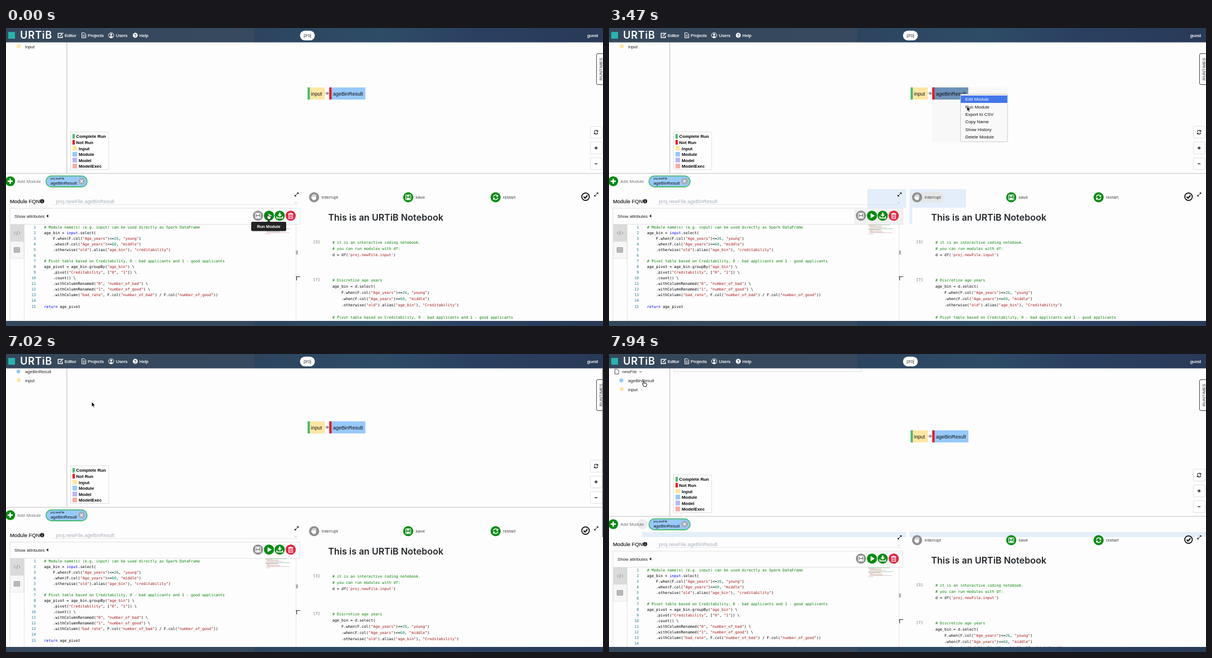
An HTML page for the animation above (8 s loop, 1059 by 529 pixels).

```html
<!DOCTYPE html>
<html lang="en">
<head>
<meta charset="utf-8">
<title>Module editor</title>
<style>
html, body { margin: 0; width: 100%; height: 100%; overflow: hidden; background: #fdfdfd; }
svg { display: block; width: 1059px; height: 529px; }
text { font-family: "Liberation Sans", Arial, sans-serif; white-space: pre; }
.mono { font-family: "DejaVu Sans Mono", monospace; font-size: 6.67px; }
.brand { font-family: Inter, sans-serif; font-weight: 600; }
</style>
</head>
<body>
<svg id="stage" viewBox="0 0 1059 529"></svg>
<script>
const LOOP = 8000;
const C = { green: '#078a12', run: '#4cbb74', red: '#e8141c', input: '#ffe6a3', module: '#97c9fb',
  model: '#b8b5f8', exec: '#f8aca3', gray: '#8f8f8f', band: '#e3eefa' };

// y is the vertical middle of the text line
const text = (x, y, str, size = 7.85, fill = '#111', attrs = '') =>
  `<text x="${x}" y="${y + size * .36}" font-size="${size}" fill="${fill}" ${attrs}>${str}</text>`;
const rect = (x, y, w, h, fill, attrs = '') =>
  `<rect x="${x}" y="${y}" width="${w}" height="${h}" fill="${fill}" ${attrs}/>`;
const circle = (x, y, r, fill, attrs = '') => `<circle cx="${x}" cy="${y}" r="${r}" fill="${fill}" ${attrs}/>`;
const line = (d, stroke = '#ddd', width = 1, attrs = '') =>
  `<path d="${d}" fill="none" stroke="${stroke}" stroke-width="${width}" ${attrs}/>`;
const fillPath = (d, fill) => `<path d="${d}" fill="${fill}"/>`;
const at = (x, y, content, scale = 1) => `<g transform="translate(${x} ${y}) scale(${scale})">${content}</g>`;
const group = (id, content) => `<g id="${id}">${content}</g>`;

const icon = {
  plus: c => line('M-3.5 0H3.5M0-3.5V3.5', c, 1.9),
  save: () => rect(-4.5, -4.5, 9, 9, 'none', 'stroke="#fff" stroke-width="1.2" rx="1"') +
    rect(-2.5, -4, 4.5, 3, '#fff') + rect(-2.8, .8, 5.6, 3.4, '#fff'),
  play: () => fillPath('M-2.5-4.5L5 0L-2.5 4.5Z', '#fff'),
  download: () => fillPath('M-1.4-5.5H1.4V-2H4L0 2L-4-2H-1.4Z', '#fff') + line('M-5 1V4.2H5V1', '#fff', 1.7),
  trash: () => rect(-3.3, -2.6, 6.6, 7.6, 'none', 'stroke="#fff" stroke-width="1.1"') +
    line('M-4.6-3.6H4.6M-1.5-4.8H1.5M-1.2-1V3.5M1.2-1V3.5', '#fff', 1),
  refresh: c => line('M-4-.8A4 4 0 0 1 3-2.8M4 .8A4 4 0 0 1-3 2.8', c, 1.6) +
    fillPath('M4.6-5V-.8H.6ZM-4.6 5V.8H-.6Z', c),
  hand: () => line('M-3.2-1V-3.4M-1.2-1V-5M.9-1V-5M3-1V-4M-5 0L-2.5 3', '#fff', 1.3, 'stroke-linecap="round"') +
    fillPath('M-3.8-1H3.6V2L2 5H-2L-4 2Z', '#fff'),
  expand: () => line('M-2.4 2.4L2.4-2.4', '#111', 1) + fillPath('M3.5-3.5V-.3L.3-3.5ZM-3.5 3.5V.3L-.3 3.5Z', '#111'),
};
const button = (x, y, color, name) => circle(x, y, 9, color) + at(x, y, icon[name]('#fff'));

const moduleCode = String.raw`# Module name(s) (e.g. input) can be used directly as Spark DataFrame
age_bin = input.select(
    F.when(F.col("Age_years")<=26, "young")
    .when(F.col("Age_years")<=60, "middle")
    .otherwise("old").alias("age_bin"), "creditability")

# Pivot table based on Creditability, 0 - bad applicants and 1 - good applicants
age_pivot = age_bin.groupBy("age_bin") \
    .pivot("Creditability", ["0", "1"]) \
    .count() \
    .withColumnRenamed("0", "number_of_bad") \
    .withColumnRenamed("1", "number_of_good") \
    .withColumn("bad_rate", F.col("number_of_bad") / F.col("number_of_good"))

return age_pivot`.split('\n');

const loadCell = `# it is an interactive coding notebook.
# you can run modules with df:
d = df('proj.newFile.input')`.split('\n');

const binCell = `# Discretize age years
age_bin = d.select(
    F.when(F.col("Age_years")<=26, "young")
    .when(F.col("Age_years")<=60, "middle")
    .otherwise("old").alias("age_bin"), "Creditability")

# Pivot table based on Creditability, 0 - bad applicants and 1 - good applicants`.split('\n');

const escape = s => s.replace(/</g, '&lt;');
const TOKEN = /(#.*$)|("[^"]*"|'[^']*')|\b(\d+)\b|\b(input|return)\b|[^#"'\d\w]+|\w+/g;
const tokenColors = ['#008000', '#a31515', '#098658', '#0000f0'];
function highlight(source) {
  return source.replace(TOKEN, (token, ...kinds) => {
    const kind = kinds.slice(0, 4).findIndex(Boolean);
    return kind < 0 ? escape(token) : `<tspan fill="${tokenColors[kind]}">${escape(token)}</tspan>`;
  });
}
const codeBlock = (x, y, step, lines) =>
  lines.map((s, i) => text(x, y + i * step, highlight(s), 6.67, '#000', 'class="mono"')).join('');

function miniMap() {
  return moduleCode.map((s, i) => {
    const indent = s.search(/\S|$/);
    return rect(460 + indent * .55, 349.3 + i * 1.13, (s.length - indent) * .55, .8,
      s[0] === '#' ? '#6faa6f' : '#c09a9a', 'opacity=".65"');
  }).join('');
}

function graph() {
  const legend = [['Complete Run', C.run], ['Not Run', C.red], ['Input', C.input],
    ['Module', C.module], ['Model', C.model], ['ModelExec', C.exec]];
  const tools = [[185, icon.refresh('#222')], [213, icon.plus('#222')], [241, line('M-3 0H3', '#222', 1.7)]];
  return line('M115 -20V1H448V-20') +
    rect(107, -10, 1.6, 268, '#d2d2d2') + rect(0, 257.5, 1059, 1.5, '#d6d6d6') +
    line('M10.5-3V5.5H17V-1L14.5-3Z', '#444', .9) +
    text(23, 1.7, 'newFile', 7.7, '#333') + line('M54 0.5L56 2.5L58 .5', '#333', .9) +
    circle(22, 17, 3.4, C.module) + text(34, 17, 'ageBinResult', 7.75, '#222') +
    circle(22.5, 32.5, 3.4, C.input) + text(34, 32.8, 'input', 7.75, '#222') +
    rect(535, 105.5, 30.5, 21.5, C.input) + rect(535, 105.5, 4, 21.5, C.run) + text(541, 116.3, 'input', 8.95) +
    line('M565.5 116H570', '#999') + fillPath('M568.5 113L574 116L568.5 119Z', '#888') +
    rect(573.5, 105.5, 64, 21.5, C.module, 'id="moduleNode"') + rect(573.5, 105.5, 4, 21.5, C.red) +
    text(580, 116.3, 'ageBinResult', 8.95) +
    rect(114.5, 184.5, 67.5, 67, '#fefefe', 'stroke="#ddd" stroke-width=".9"') +
    legend.map(([label, color], i) => rect(118, 188.2 + i * 10.55, i < 2 ? 4 : 8, 8.3, color) +
      text(i < 2 ? 124.5 : 129, 192.6 + i * 10.55, label, 7.8, '#000', 'font-weight="bold"')).join('') +
    tools.map(([y, art]) => rect(1036.5, y - 10.5, 21, 21, '#fff', 'rx="1.5" stroke="#e2e2e2"') +
      at(1046.7, y, art, .8)).join('');
}

function modulePanel() {
  return circle(7.5, 272, 8.7, C.green) + at(7.5, 272, icon.plus('#fff'), 1.3) +
    text(20, 272, 'Add Module', 7.85, '#777') +
    rect(71, 262.7, 72.8, 19.3, C.module, `rx="9.6" stroke="${C.run}" stroke-width="1.8"`) +
    text(79, 267.5, 'proj.newFile', 4.5) + text(79, 274.8, 'ageBinResult', 7.8) +
    circle(134, 272, 6, '#a3adb5') + line('M131.7 269.7L136.3 274.3M136.3 269.7L131.7 274.3', '#fff', 1.2) +
    text(7, 307.3, 'Module FQN', 9.4, '#222', 'stroke="#222" stroke-width=".2"') +
    circle(64, 307.5, 3.7, '#111') + line('M64 306.8V310M64 304.8V306', '#fff', 1.1) +
    text(88.5, 307.3, 'proj.newFile.ageBinResult', 8.95, '#a9b0bb') +
    line('M83 313.5H518', '#e3e3e3', .8) + line('M511.5 309L513.7 311L516 309', '#aaa', .8) +
    at(515.5, 295.5, icon.expand()) +
    line('M7 520V320H521V348.5H7', '#dedede', .9) + text(15, 333.7, 'Show attributes', 7.8, '#222') +
    fillPath('M75 331V336.4L71.5 333.7Z', '#222') +
    group('toolbarTint', rect(435, 322, 85.5, 25.5, '#f1f1f1')) +
    button(447, 333.2, C.gray, 'save') + button(466.5, 333.2, C.green, 'play') +
    button(485.5, 333.2, C.green, 'download') + button(505, 333.2, '#dc2846', 'trash') +
    rect(7.5, 349, 24.5, 30, '#dadada') + rect(7.5, 379, 24.5, 30, '#f6f6f6', 'stroke="#ddd" stroke-width=".7"') +
    line('M17 361.5L14.5 364L17 366.5M22.5 361.5L25 364L22.5 366.5M20.7 360.5L18.7 367.5', '#888', .9) +
    rect(14.5, 390, 9.5, 8, 'none', 'stroke="#777"') + line('M14.5 392.8H24M14.5 395.3H24M17.7 390V398M20.9 390V398', '#777', .8) +
    line('M32.3 349V520', '#ddd', .8) +
    moduleCode.map((_, i) => text(53, 353.7 + i * 10.03, i + 1, 6.67, '#237893', 'class="mono" text-anchor="end"')).join('') +
    codeBlock(67.5, 353.7, 10.03, moduleCode) + miniMap() +
    line('M514.5 349V560', '#e0e0e0', .8) + rect(514, 395, 4, 7, '#b5b5b5') + line('M514 441.5H522M515.5 441.5V448', '#333', 1.2);
}

function notebook() {
  return button(546.5, 300.5, C.gray, 'hand') + text(560, 300, 'interrupt', 7.9, '#444') +
    button(713.5, 300.5, C.green, 'save') + text(726.5, 300, 'save', 7.9, '#444') +
    button(868.5, 300.5, C.green, 'refresh') + text(881.5, 300, 'restart', 7.9, '#444') +
    circle(1028, 299.5, 6.7, '#fff', 'stroke="#111" stroke-width="1.8"') +
    line('M1024.6 299.5L1027.2 302L1031.5 297', '#111', 2) + at(1047, 295.5, icon.expand()) +
    text(571.5, 336, 'This is an URTiB Notebook', 16, '#23272b', 'class="brand"') +
    text(545, 380, '[3]', 6.9, '#666', 'class="mono"') + codeBlock(579, 380.3, 11.1, loadCell) +
    text(545, 447, '[7]', 6.9, '#666', 'class="mono"') + codeBlock(579, 447.3, 11.1, binCell);
}

function contextMenu() {
  const items = ['Edit Module', 'Run Module', 'Export to CSV', 'Copy Name', 'Show History', 'Delete Module'];
  return rect(637.5, 105.5, 69.5, 12, '#f8f8f8') + rect(573.5, 127, 50, 75, '#f8f8f8') +
    rect(623.5, 117.5, 83.5, 84.5, '#f9f9f9', 'rx="1.5" stroke="#c4c4c4" stroke-width=".9"') +
    rect(624, 119.8, 82.6, 13.2, '#4377ea', 'id="menuBar"') +
    items.map((label, i) => text(632, 126.5 + i * 13.35, label, 7.9, '#111', 'class="item"')).join('');
}

function header() {
  const label = (x, str) => text(x, 13.2, str, 7.85, '#fff', 'stroke="#fff" stroke-width=".2"');
  return rect(0, 0, 1059, 25.5, 'url(#bar)') + rect(4, 7, 12, 12, '#28b3ae') +
    text(25, 13, 'URTiB', 18, '#fff', 'class="brand" letter-spacing=".7"') +
    line('M99 9.5H92.5V17H100V13.5M95.5 14.5L101.5 8.5', '#fff', 1.4) + label(104, 'Editor') +
    line('M134.5 8.5H139L141.5 11V17.5H134.5ZM136 12.5H140M136 15H140', '#fff', 1) + label(145, 'Projects') +
    circle(186.5, 13, 4.6, 'none', 'stroke="#fff"') + circle(186.5, 11.7, 1.9, '#fff') +
    fillPath('M183 16.2Q186.5 12.5 190 16.2L186.5 17.6Z', '#fff') + label(195, 'Users') +
    circle(229.3, 13, 4.4, '#fff') + text(229.3, 13, '?', 7.5, '#30465b', 'font-weight="bold" text-anchor="middle"') +
    label(236.5, 'Help') + rect(521.5, 4.7, 26.3, 17.4, '#fff', 'rx="8.7"') +
    text(534.8, 13, 'proj', 8.3, '#444', 'text-anchor="middle"') + label(1031, 'guest');
}

const bandPatches = rect(458, 286, 69, 33, C.band) + rect(533, 286, 100, 33, C.band) +
  rect(458, 319, 63, 29, '#f1f5fa') + rect(533, 319, 5, 29, C.band) + rect(547, 291, 47, 18.5, '#e4e6e8', 'rx="9"');
const bandStrip = rect(59, 286, 468, 9, C.band) + rect(533, 286, 526, 9, C.band) + rect(50, 263, 18.5, 18, '#ececec', 'rx="9"');

const arrow = '<path d="M0 0V8.6L2 6.8L3.4 10L4.9 9.3L3.5 6.3H6.2Z" fill="#000" stroke="#fff" stroke-width=".7"/>';
const hand = `<path d="M-2.2-4.5Q-1.2-5.5-.6-4.3V-1.5L3.6-.6Q4.4 0 4 1.8L3 4.8H-1.2L-4-.2Q-3.4-1.3-2.2 0Z"
  fill="#fff" stroke="#111" stroke-width="1"/>`;

document.getElementById('stage').innerHTML = `
  <defs><linearGradient id="bar">
    <stop offset="0" stop-color="#35475a"/><stop offset=".415" stop-color="#37495f"/>
    <stop offset=".416" stop-color="#2d445f"/><stop offset=".63" stop-color="#2e4c66"/>
    <stop offset=".78" stop-color="#2b4061"/><stop offset="1" stop-color="#293a58"/>
  </linearGradient></defs>` +
  rect(0, 0, 1059, 529, '#fdfdfd') +
  group('page', graph() + group('bandPatches', bandPatches) + group('bandStrip', bandStrip) + modulePanel() + notebook() +
    group('menu', contextMenu()) +
    group('tooltip', rect(435, 344, 62, 16.5, '#222', 'rx="2"') + fillPath('M463 344.2L466 341L469 344.2Z', '#222') +
      text(466, 352, 'Run Module', 7.3, '#fff', 'font-weight="bold" text-anchor="middle"'))) +
  rect(1047.5, 45.5, 16, 55, '#fff', 'rx="2.5" stroke="#333" stroke-width=".9"') +
  at(1055.5, 73, '<g transform="rotate(-90)">' + text(0, 0, 'RUNTIMES', 7.7, '#333', 'text-anchor="middle"') + '</g>') +
  group('scrollbar', rect(1057.6, 26, 1.4, 299, '#888')) +
  header() + rect(0, 520, 1059, 9, 'url(#bar)') +
  group('cursor', group('arrow', arrow) + group('hand', hand));

const pointer = [[0, 466, 335], [450, 466, 336], [600, 467, 337], [750, 468, 338], [1540, 469, 340], [1680, 470, 342],
  [2130, 500, 300], [2280, 560, 210], [2420, 608, 135], [2570, 623, 117], [3470, 635, 139], [3770, 637, 141], [4210, 638, 140],
  [4800, 590, 136], [4950, 426, 116], [5090, 397, 104], [5390, 391, 102], [5540, 340, 88], [5690, 270, 76],
  [5830, 215, 74], [5980, 170, 81], [6130, 152, 85], [7370, 130, 76], [7560, 88, 60], [7750, 65, 54], [7940, 63, 53]];
const scroll = [[0, 0], [7020, 14], [7160, 29], [7370, 30]];
const menuChoice = [[0, -1], [3470, 0], [3620, 1], [4800, -1]];
const held = (keys, t) => keys.findLast(key => key[0] <= t).slice(1);

const $ = id => document.getElementById(id);
const show = (id, on) => $(id).setAttribute('display', on ? 'inline' : 'none');
const between = (t, from, to) => t >= from && t < to;
const menuItems = document.querySelectorAll('.item');

function draw(now) {
  const t = now % LOOP;
  const [x, y] = held(pointer, t);
  const [choice] = held(menuChoice, t);
  const menuOpen = between(t, 3020, 6420);
  const pointing = t < 2130 || t >= 7750;
  $('page').setAttribute('transform', `translate(0 ${held(scroll, t)[0]})`);
  $('cursor').setAttribute('transform', `translate(${x} ${y})`);
  $('moduleNode').setAttribute('fill', menuOpen ? '#6d91b8' : C.module);
  $('menuBar').setAttribute('y', 119.8 + choice * 13.35);
  menuItems.forEach((item, i) => item.setAttribute('fill', i === choice ? '#fff' : '#111'));
  show('menuBar', choice >= 0);
  show('menu', menuOpen);
  show('hand', pointing);
  show('arrow', !pointing);
  show('tooltip', t < 750);
  show('toolbarTint', between(t, 750, 7020));
  show('bandPatches', between(t, 2130, 7020));
  show('bandStrip', t >= 7750);
  show('scrollbar', between(t, 7020, 7560));
  requestAnimationFrame(draw);
}
requestAnimationFrame(draw);
</script>
</body>
</html>
```
